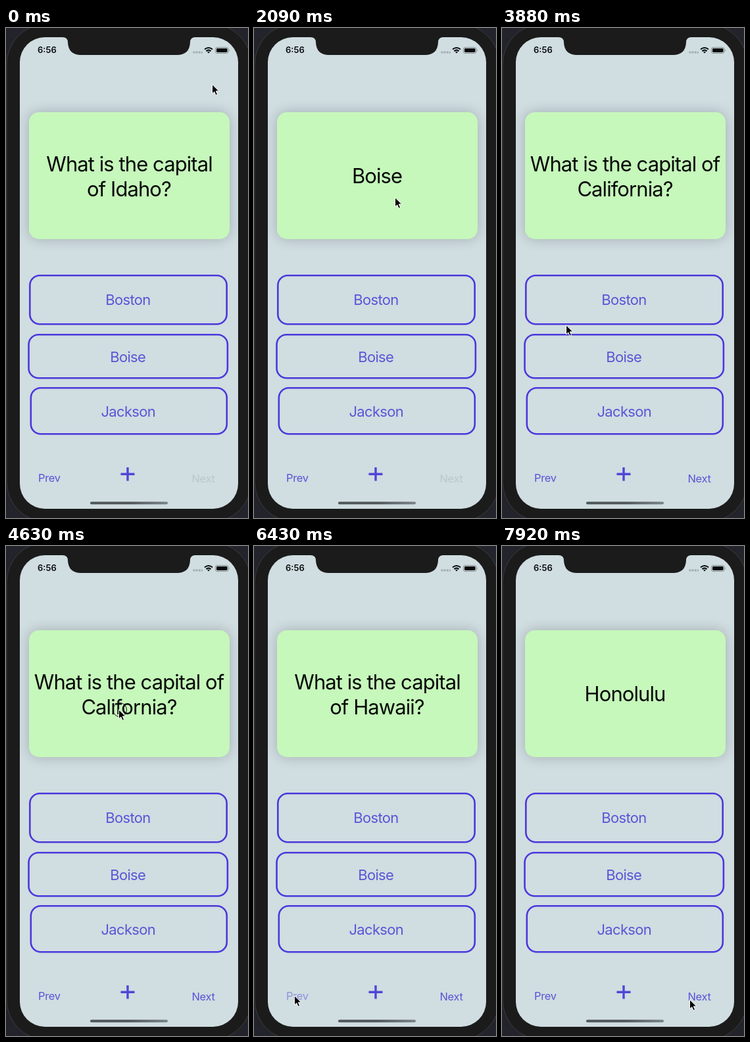
An HTML page that plays this animation: 368x745 px, repeating every 8000 ms.

```html
<!DOCTYPE html>
<html lang="en">
<head>
<meta charset="utf-8">
<title>State capital flashcards</title>
<style>
  html, body { margin: 0; width: 100%; height: 100%; overflow: hidden; background: #22232b; }
  svg { display: block; width: 368px; height: 745px; font-family: Inter, "Liberation Sans", sans-serif; }

  .mid { text-anchor: middle; }
  .card-text { font-size: 31px; letter-spacing: -.03em; fill: #050805; }
  .choice rect { fill: none; stroke: #4b38dc; stroke-width: 2.6; }
  .choice text { font-size: 22px; letter-spacing: -.03em; fill: #5856d6; }
  .nav { font-size: 16.5px; letter-spacing: -.02em; fill: #5856d6; }

  #cards, #cursor, #tap, #prev, #next { animation: 8s step-end infinite; }
  #cards { animation-name: cards; }
  #cursor { animation-name: cursor; }
  #tap { animation-name: tap; }
  #prev { animation-name: prev; }
  #next { animation-name: next; }

  /* Each card text sits 200px below the previous one, clipped by the card. */
  @keyframes cards {
    0% { transform: translateY(0); }
    26.125% { transform: translateY(-200px); }
    42.875% { transform: translateY(-400px); }
    59.75% { transform: translateY(-600px); }
    80.375% { transform: translateY(-800px); }
    91.5%, 100% { transform: translateY(-1000px); }
  }

  @keyframes cursor {
    0% { transform: translate(313px, 85px); }
    5.625% { transform: translate(303px, 118px); }
    7.5% { transform: translate(280px, 180px); }
    9.375% { transform: translate(264px, 212px); }
    15% { transform: translate(259px, 222px); }
    16.875% { transform: translate(247px, 236px); }
    18.75% { transform: translate(232px, 248px); }
    20.625% { transform: translate(220px, 255px); }
    22.5% { transform: translate(214px, 257px); }
    33.625% { transform: translate(196px, 310px); }
    35.5% { transform: translate(125px, 470px); }
    37.375% { transform: translate(41px, 640px); }
    39.125% { transform: translate(60px, 680px); }
    48.5% { transform: translate(97px, 451px); }
    50.375% { transform: translate(185px, 290px); }
    52.25% { transform: translate(212px, 256px); }
    54.125% { transform: translate(171px, 248px); }
    65.375% { transform: translate(160px, 290px); }
    67.25% { transform: translate(110px, 480px); }
    69.125% { transform: translate(70px, 640px); }
    71% { transform: translate(61px, 683px); }
    82.25% { transform: translate(70px, 600px); }
    84.125% { transform: translate(110px, 300px); }
    85.875% { transform: translate(150px, 150px); }
    87.75% { transform: translate(169px, 212px); }
    93.375% { transform: translate(190px, 290px); }
    95.25% { transform: translate(240px, 480px); }
    97.125% { transform: translate(279px, 650px); }
    99%, 100% { transform: translate(285px, 689px); }
  }

  @keyframes tap {
    0%, 26.125%, 42.875%, 59.75%, 80.375%, 91.5%, 100% { opacity: 0; }
    24.25%, 41%, 57.875%, 78.5%, 89.625% { opacity: 1; }
  }

  @keyframes prev {
    0%, 46.625%, 82.25%, 100% { opacity: 1; }
    41%, 78.5% { opacity: .14; }
    42.875%, 80.375% { opacity: .55; }
    44.75% { opacity: .85; }
  }

  @keyframes next {
    0% { fill: #bdc7cb; }
    42.875%, 100% { fill: #5856d6; }
  }
</style>
</head>
<body>
<svg viewBox="0 0 368 745">
  <defs>
    <clipPath id="screen"><rect x="21" y="14" width="332" height="717" rx="38"/></clipPath>
    <clipPath id="face"><rect x="35" y="128" width="305" height="193" rx="15"/></clipPath>
    <filter id="blur" x="-20%" y="-20%" width="140%" height="140%"><feGaussianBlur stdDeviation="10"/></filter>
    <linearGradient id="bar">
      <stop offset=".5" stop-color="#50585a"/>
      <stop offset="1" stop-color="#7b8587"/>
    </linearGradient>
  </defs>

  <!-- Phone -->
  <rect width="368" height="745" fill="#22232b"/>
  <rect x="1" y="-6" width="372" height="757" rx="61" fill="#1b1b1b" stroke="#3c3c3e"/>

  <g clip-path="url(#screen)">
    <rect x="21" y="14" width="332" height="717" fill="#d0dde1"/>
    <rect x="35" y="128" width="305" height="193" rx="15" fill="#000" opacity=".21" filter="url(#blur)"/>
  </g>
  <path d="M86 13V14Q94 14 94 22Q95 41 114 41H260Q279 41 280 22Q280 14 288 14V13Z" fill="#1b1b1b"/>

  <!-- Status bar -->
  <text x="48" y="38" font-size="13" font-weight="600" fill="#0a0d0e">6:56</text>
  <path d="M284.5 37H299" stroke="#a3adb0" stroke-width="3" stroke-dasharray="3 1.2"/>
  <g fill="none" stroke="#0a0d0e" stroke-width="2">
    <path d="M302 32.6Q308 27.4 314 32.6M304.4 35.2Q308 32 311.6 35.2"/>
    <path d="M306 36.4Q308 35 310 36.4L308 38.5Z" fill="#0a0d0e" stroke="none"/>
  </g>
  <rect x="318.5" y="29.5" width="19.5" height="9" rx="2.6" fill="none" stroke="#7f898c"/>
  <rect x="320" y="31" width="16.5" height="6" rx="1.4" fill="#050606"/>
  <path d="M339.3 32.3Q341 34 339.3 35.7Z" fill="#7f898c"/>

  <!-- Card -->
  <rect x="35" y="128" width="305" height="193" rx="15" fill="#c6f7bb"/>
  <g clip-path="url(#face)">
    <g id="cards" class="mid card-text">
      <text y="217.5"><tspan x="187.5">What is the capital</tspan><tspan x="187" dy="38">of Idaho?</tspan></text>
      <text x="187" y="436">Boise</text>
      <text y="617.5"><tspan x="187">What is the capital of</tspan><tspan x="187" dy="38">California?</tspan></text>
      <text x="187" y="836">Sacramento</text>
      <text y="1017.5"><tspan x="187.5">What is the capital</tspan><tspan x="187" dy="38">of Hawaii?</tspan></text>
      <text x="187" y="1236">Honolulu</text>
    </g>
  </g>

  <!-- Answers -->
  <g class="choice mid">
    <rect x="36.3" y="376.3" width="299.4" height="74" rx="15"/>
    <text x="185.5" y="421">Boston</text>
    <rect x="34.5" y="466.3" width="302.4" height="66" rx="15"/>
    <text x="185.2" y="508">Boise</text>
    <rect x="37.8" y="547.3" width="298" height="70" rx="15"/>
    <text x="185.8" y="590.5">Jackson</text>
  </g>

  <!-- Navigation -->
  <text id="prev" class="nav" x="49" y="690">Prev</text>
  <text id="next" class="nav" x="282.5" y="691">Next</text>
  <path d="M174.5 678.3H195.5M185 668V688.6" stroke="#5244d8" stroke-width="3.4"/>
  <rect x="128" y="720.3" width="118" height="4" rx="2" fill="url(#bar)"/>

  <!-- Pointer -->
  <g id="cursor">
    <circle id="tap" cx="2" cy="1" r="10.5" fill="none" stroke="#111"/>
    <path d="M.5 .8V14.8L3.8 11.9L6.1 17.2L8.6 16.1L6.3 10.9H10.7Z" fill="#000" stroke="#fff" stroke-width="1" stroke-linejoin="round"/>
  </g>
</svg>
</body>
</html>
```
